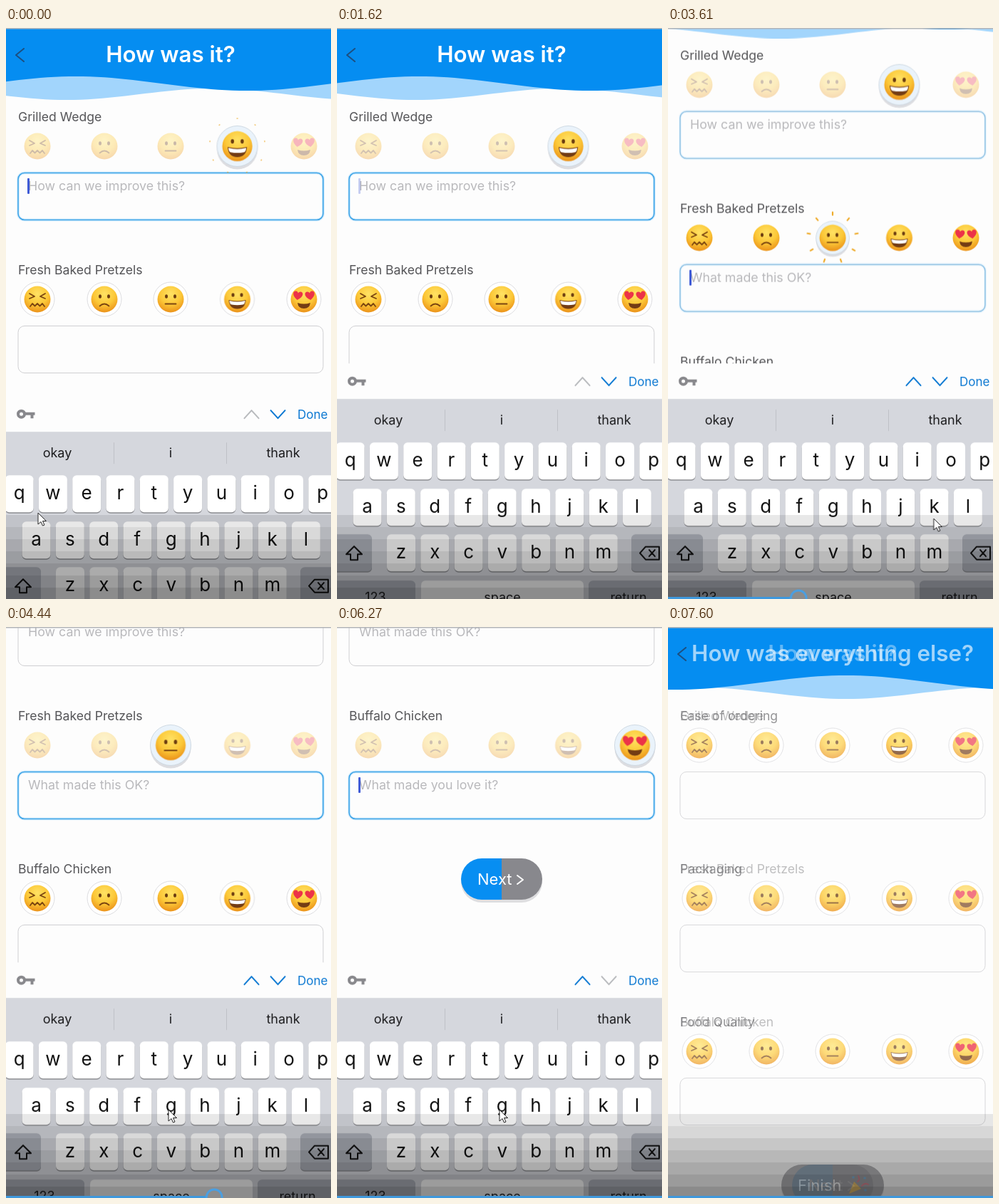
An HTML page for the animation above (7.7 s loop, 456 by 802 pixels).

```html
<!DOCTYPE html>
<html lang="en">
<head>
<meta charset="utf-8">
<title>Meal feedback</title>
<style>
  html, body { margin: 0; width: 100%; height: 100%; overflow: hidden; background: #fdfdfd; }
  svg { display: block; width: 100vw; height: 100vh; font-family: Inter, Roboto, sans-serif; }
  .title { font-size: 31.3px; font-weight: 600; fill: #fff; text-anchor: middle; }
  .label { font-size: 17.6px; fill: #555558; }
  .hint { font-size: 17.8px; fill: #b9b9bc; }
  .button { font-size: 22px; fill: #fff; }
  .box { fill: #fdfdfd; stroke: #cfcfd2; }
  .ring { fill: #fff; stroke: #dcdcdf; }
  .caret { fill: #3f5bd6; }
  .ray { stroke: #eeaa28; stroke-width: 2.2; stroke-linecap: round; }
  .letter { font-size: 26px; text-anchor: middle; fill: #111; }
  .word { font-size: 18px; text-anchor: middle; fill: #1c1c1e; }
  .line { fill: none; stroke-width: 2; stroke-linecap: round; stroke-linejoin: round; }
  .ink { fill: none; stroke: #7a4510; stroke-width: 1.8; stroke-linecap: round; stroke-linejoin: round; }
</style>
</head>
<body>
<svg viewBox="0 0 456 802">
  <defs>
    <radialGradient id="skin" cx=".5" cy=".3" r=".72">
      <stop offset="0" stop-color="#ffe264"/>
      <stop offset=".55" stop-color="#fcc838"/>
      <stop offset="1" stop-color="#ea8f18"/>
    </radialGradient>
    <linearGradient id="half">
      <stop offset=".5" stop-color="#078ef2"/>
      <stop offset=".5" stop-color="#88888d"/>
    </linearGradient>
    <circle id="head" r="18.5" fill="url(#skin)"/>
    <g id="eyes" fill="#6b3c10">
      <ellipse cx="-6" cy="-4" rx="2" ry="2.8"/>
      <ellipse cx="6" cy="-4" rx="2" ry="2.8"/>
    </g>
    <path id="heart" d="M0 6.5C-9 1-7.500-5.500-3.500-5.500C-1.500-5.500-.5-4.500 0-3C.5-4.500 1.500-5.500 3.500-5.500C7.500-5.500 9 1 0 6.500Z" fill="#ec3348"/>
    <g id="face0">
      <use href="#head"/>
      <path class="ink" d="M-11-8L-4-4L-11-1M11-8L4-4L11-1M-10 10L-7 6L-3.500 9.500L0 6L3.500 9.500L7 6L10 10"/>
    </g>
    <g id="face1">
      <use href="#head"/><use href="#eyes"/>
      <path class="ink" d="M-6.500 9.500Q0 3.500 6.500 9.500"/>
    </g>
    <g id="face2">
      <use href="#head"/><use href="#eyes"/><path class="ink" d="M-7.500 6.500H7.500"/>
    </g>
    <g id="face3">
      <use href="#head"/><use href="#eyes" y="-2"/>
      <path d="M-12 1Q0 4 12 1Q11 13.500 0 13.500Q-11 13.500-12 1Z" fill="#733c14"/>
      <path d="M-11 2Q0 5 11 2Q10.500 7 8 7.500Q0 9-8 7.500Q-10.500 7-11 2Z" fill="#fff"/>
    </g>
    <g id="face4">
      <use href="#head"/>
      <use href="#heart" transform="translate(-8.500 -5.500) rotate(8)"/>
      <use href="#heart" transform="translate(8.500 -5.500) rotate(-8)"/>
      <path d="M-9 5Q0 8 9 5Q8 13 0 13Q-8 13-9 5Z" fill="#733c14"/>
    </g>
  </defs>

  <rect width="456" height="802" fill="#fdfdfd"/>
  <g id="scroll">
    <path id="waveLight" fill="#a2d5fc"/>
    <path id="waveDark" fill="#058df1"/>
    <path class="line" d="M25 29L14 38L25 47" stroke="#1d4f80" stroke-width="1.800"/>
    <g id="meal"></g>
    <g id="extras"></g>
  </g>
  <g id="keyboard"></g>
  <g id="shade"></g>
  <rect width="456" height="1.500" fill="#b4b6b9"/>
  <g id="thumb">
    <rect x="-500" y="799" width="490" height="3" fill="#3f98dc"/>
    <circle cy="801" r="11" fill="none" stroke="#4a9fe2" stroke-width="3"/>
  </g>
  <path id="pointer" d="M0 0V16L4 12.500L6.500 18L9 17L6.500 11.500H11.500Z" fill="#fff" stroke="#222"/>
</svg>

<script>
const LOOP = 7700;
const RESET = 7290;
const COLUMNS = [44, 138, 231, 324.5, 418];
const ROW_STEP = 215;
const RAYS = 9;
const EASE = ';animation-timing-function:ease-in-out';
const OUT = ';animation-timing-function:ease-out';
const BLUE = '#0b78d2', GREY = '#b8babd';

// pick: moment of the tap; blur: moment the field loses focus
const MEALS = [
  { name: 'Grilled Wedge', hint: 'How can we improve this?', face: 3, pick: -500, caret: 0, blur: 3470 },
  { name: 'Fresh Baked Pretzels', hint: 'What made this OK?', face: 2, pick: 3480, caret: 3630, blur: 5560 },
  { name: 'Buffalo Chicken', hint: 'What made you love it?', face: 4, pick: 5570, caret: 5720, blur: 7180 },
];
const EXTRAS = ['Ease of ordering', 'Packaging', 'Food Quality'];

const byId = id => document.getElementById(id);
const move = (x, y = 0) => `transform:translate(${x}px,${y}px)`;
const alpha = a => `opacity:${a}`;

// Keyframes from [ms, css] stops, held before the first and after the last.
// Of the stops before the loop begins only the latest counts.
let sheet = '', trackCount = 0;
function track(selector, ...stops) {
  const first = stops.findLast(([ms]) => ms <= 0) ?? stops[0];
  const all = [[0, first[1]], ...stops.filter(([ms]) => ms > 0), [LOOP, stops.at(-1)[1]]];
  const frames = all.map(([ms, css]) => `${(ms / LOOP * 100).toFixed(4)}%{${css}}`);
  const name = `track${trackCount++}`;
  sheet += `@keyframes ${name}{${frames.join('')}}${selector}{animation:${name} ${LOOP}ms linear infinite}\n`;
}

function wave(id, middle, swing, length) {
  let d = 'M-700 0';
  for (let x = -700; x <= 1100; x += 10) {
    d += `L${x} ${(middle + swing * Math.cos(2 * Math.PI * x / length)).toFixed(2)}`;
  }
  byId(id).setAttribute('d', d + 'V0Z');
}

const fieldRect = attributes => `<rect x="17" y="203.5" width="428" height="66" rx="9" ${attributes}/>`;

function faceCell(face, i, meal) {
  const at = `<g transform="translate(${COLUMNS[face]} 166)">`;
  const use = `<use href="#face${face}"/>`;
  if (!meal) return `${at}<circle class="ring" r="24"/>${use}</g>`;
  const ring = `<g class="rings${i}"><circle class="ring${face === meal.face ? ` press${i}` : ''}" r="24"/></g>`;
  if (face !== meal.face) return `${at}${ring}<g class="rest${i}">${use}</g></g>`;
  const rays = Array.from({ length: RAYS }, (_, k) =>
    `<g transform="rotate(${k * 360 / RAYS})"><path class="ray ray${i}" d="M0-2V2"/></g>`).join('');
  return `${at}${ring}
    <g class="disc${i}"><circle cy="4" r="28.5" fill="#dcdde1"/>
      <circle r="28.5" fill="#eaf3fb" stroke="#cfd9e2"/></g>
    <g class="chosen${i}">${use}</g>${rays}</g>`;
}

function row(name, i, meal) {
  const active = meal ? `
    <g class="focus${i}" fill="none">
      ${fieldRect('stroke="#d6edfc" stroke-width="4"')}
      ${fieldRect('stroke="#3aa2e6" stroke-width="1.5"')}
    </g>
    <text class="hint hint${i}" x="31" y="228">${meal.hint}</text>
    <rect class="caret caret${i}" x="30" y="211" width="3" height="22" rx="1"/>` : '';
  return `<g transform="translate(0 ${i * ROW_STEP})">
    <text class="label" x="17" y="130.500">${name}</text>
    ${fieldRect('class="box"')}${active}${COLUMNS.map((_, face) => faceCell(face, i, meal)).join('')}</g>`;
}

const pill = (x, width, fill) =>
  `<rect x="${x}" y="759" width="${width}" height="58" rx="29" fill="#dedee0"/>
   <rect x="${x}" y="755" width="${width}" height="58" rx="29" fill="${fill}"/>`;

byId('meal').innerHTML = `<text class="title" x="231" y="48">How was it?</text>
  ${MEALS.map((meal, i) => row(meal.name, i, meal)).join('')}
  ${pill(174, 114, 'url(#half)')}
  <text class="button" x="197" y="792">Next</text>
  <path class="line" d="M253 779L261 785L253 791" stroke="#fff"/>`;

byId('extras').innerHTML = `<text class="title" x="231" y="48">How was everything else?</text>
  ${EXTRAS.map((name, i) => row(name, i)).join('')}
  ${pill(159, 144, '#88888d')}
  <text class="button" x="182" y="792">Finish</text>
  <path d="M254 796L261 779L271 789Z" fill="#f2b632"/>
  <path class="line" d="M266 779Q270 776 267 771M272 785Q276 780 281 783" stroke="#d9566a"/>
  <g fill="#4fa3e0"><circle cx="260" cy="773" r="1.800"/><circle cx="276" cy="774" r="1.800"/><circle cx="277" cy="791" r="1.800"/></g>`;

// Keyboard
const plate = (x, y, width, fill) =>
  `<rect x="${x}" y="${y + 1.5}" width="${width}" height="52" rx="6" fill="#8b8c90"/>
   <rect x="${x}" y="${y}" width="${width}" height="52" rx="6" fill="${fill}"/>`;
const keyRow = (letters, firstX, y) => [...letters].map((letter, k) => {
  const x = firstX + k * 47.3;
  return plate(x - 20, y, 40, '#fff') + `<text class="letter" x="${x}" y="${y + 34}">${letter}</text>`;
}).join('');
const word = (text, x, y) => `<text class="word" x="${x}" y="${y}">${text}</text>`;

byId('keyboard').innerHTML = `
  <rect y="471" width="456" height="51" fill="#fdfdfd"/>
  <g fill="none" stroke="#88888c"><circle cx="21.500" cy="496" r="4.500" stroke-width="4"/>
    <path d="M27 495.500H40.500M36.500 495.500V502" stroke-width="4"/></g>
  <path id="prev" class="line" d="M334.500 502L344.500 491L354.500 502"/>
  <path id="next" class="line" d="M371.500 491L381.500 502L391.500 491"/>
  <text x="409" y="502.500" font-size="17" fill="${BLUE}">Done</text>
  <rect y="521" width="456" height="340" fill="#d5d7dd"/>
  <path d="M151.500 536V566M309.500 536V566" stroke="#bfc1c7"/>
  ${word('okay', 72, 557)}${word('i', 231, 557)}${word('thank', 389, 557)}
  ${keyRow('qwertyuiop', 18.6, 582)}${keyRow('asdfghjkl', 42.5, 647)}${keyRow('zxcvbnm', 90, 711)}
  ${plate(-8, 711, 57, '#adb1ba')}${plate(413, 711, 60, '#adb1ba')}
  ${plate(-8, 776, 118, '#adb1ba')}${plate(118, 776, 228, '#fff')}${plate(353, 776, 120, '#adb1ba')}
  <path class="line" d="M24 728L35 739H29V747H19V739H13Z" stroke="#111"/>
  <path class="line" d="M425 737.500L433 728.500H452V746.500H433ZM438 733L446 742M446 733L438 742" stroke="#111"/>
  ${word('123', 54, 806)}${word('space', 232, 806)}${word('return', 409, 806)}`;

// Player shade in even bands
byId('shade').innerHTML = Array.from({ length: 7 }, (_, k) =>
  `<rect y="${684 + 17 * k}" width="456" height="17" opacity="${.09 + .06 * k}"/>`).join('');

// Waves
wave('waveLight', 93, 8, 410);
wave('waveDark', 78, -10, 480);
track('#waveLight', [0, move(85)], [1620, move(110)], [3070, move(145)], [7600, move(250)], [LOOP, move(253)]);
track('#waveDark', [0, move(98)], [1620, move(115)], [3070, move(138)], [7600, move(250)], [LOOP, move(253)]);

// Pages
track('#scroll',
  [3461, move(0, 0) + EASE], [3800, move(0, -215)],
  [5560, move(0, -215) + EASE], [5890, move(0, -430)],
  [7180, move(0, -430) + EASE], [7470, move(0, 0)]);
track('#meal', [7450, alpha(1)], [7690, alpha(0)]);
track('#extras', [7450, alpha(0)], [7690, alpha(1)]);
track('#keyboard', [0, move(0, 46.5) + OUT], [250, move(0, 0)], [7180, move(0, 0) + EASE], [7480, move(0, 340)]);
track('#prev', [3480, `stroke:${GREY}`], [3560, `stroke:${BLUE}`]);
track('#next', [5570, `stroke:${BLUE}`], [5650, `stroke:${GREY}`]);

// Rating rows
MEALS.forEach(({ pick, caret, blur }, i) => {
  const scale = s => `transform:scale(${s})`;
  const disc = (s, a) => `${scale(s)};${alpha(a)}`;
  const ray = (y, s, a) => `transform:translateY(${-y}px) scaleY(${s});${alpha(a)}`;
  const cleared = RESET + 140;
  track(`.press${i}`, [pick - 160, scale(1)], [pick - 80, scale(.92)], [RESET, scale(.92)], [cleared, scale(1)]);
  track(`.rings${i}`, [pick, alpha(1)], [pick + 120, alpha(0)], [RESET, alpha(0)], [cleared, alpha(1)]);
  track(`.rest${i}`, [pick + 150, alpha(1)], [pick + 500, alpha(.36)], [pick + 700, alpha(.32)]);
  track(`.disc${i}`, [pick, disc(.6, 0)], [pick + 130, disc(.82, 1) + OUT], [pick + 450, disc(1, 1)],
    [RESET, disc(1, 1)], [cleared, disc(.8, 0)]);
  track(`.chosen${i}`, [pick + 130, scale(1) + OUT], [pick + 450, scale(1.14)], [RESET, scale(1.14)], [cleared, scale(1)]);
  track(`.ray${i}`, [pick - 1, ray(22, 1, 0)], [pick, ray(22, 1, 1)], [pick + 130, ray(34, 1, 1) + OUT],
    [pick + 500, ray(39, .2, .9)], [pick + 650, ray(40, .1, 0)]);
  track(`.hint${i}`, [pick, alpha(0)], [pick + 60, alpha(1)], [RESET, alpha(1)], [cleared, alpha(0)]);
  track(`.focus${i}`, [pick, alpha(0)], [pick + 270, alpha(1)], [blur, alpha(1)], [blur + 260, alpha(0)]);

  const blink = [[pick, alpha(0)], [pick + 1, alpha(1)]];
  for (let start = caret; start < blur; start += 1000) {
    blink.push([start, alpha(1)], [start + 550, alpha(1)], [start + 650, alpha(0)], [start + 930, alpha(0)]);
  }
  const shown = blink.filter(([ms]) => ms < blur);
  track(`.caret${i}`, ...shown, [blur - 1, shown.at(-1)[1]], [blur, alpha(0)]);
});

// Player overlay
track('#thumb', [2420, move(-20)], [3070, move(100)], [3610, move(183)], [5490, move(430)], [5720, move(480)]);
track('#pointer',
  [0, move(45, 681)], [300, move(20, 688)], [450, move(-20, 700)], [2649, move(-20, 700)],
  [2650, move(470, 690)], [2900, move(450, 685)], [3070, move(445, 686)], [3610, move(373, 689)],
  [4000, move(290, 698)], [4400, move(228, 678)], [6400, move(228, 678)], [6401, move(-40, 678)]);

const style = document.createElement('style');
style.textContent = sheet;
document.head.append(style);
</script>
</body>
</html>
```
